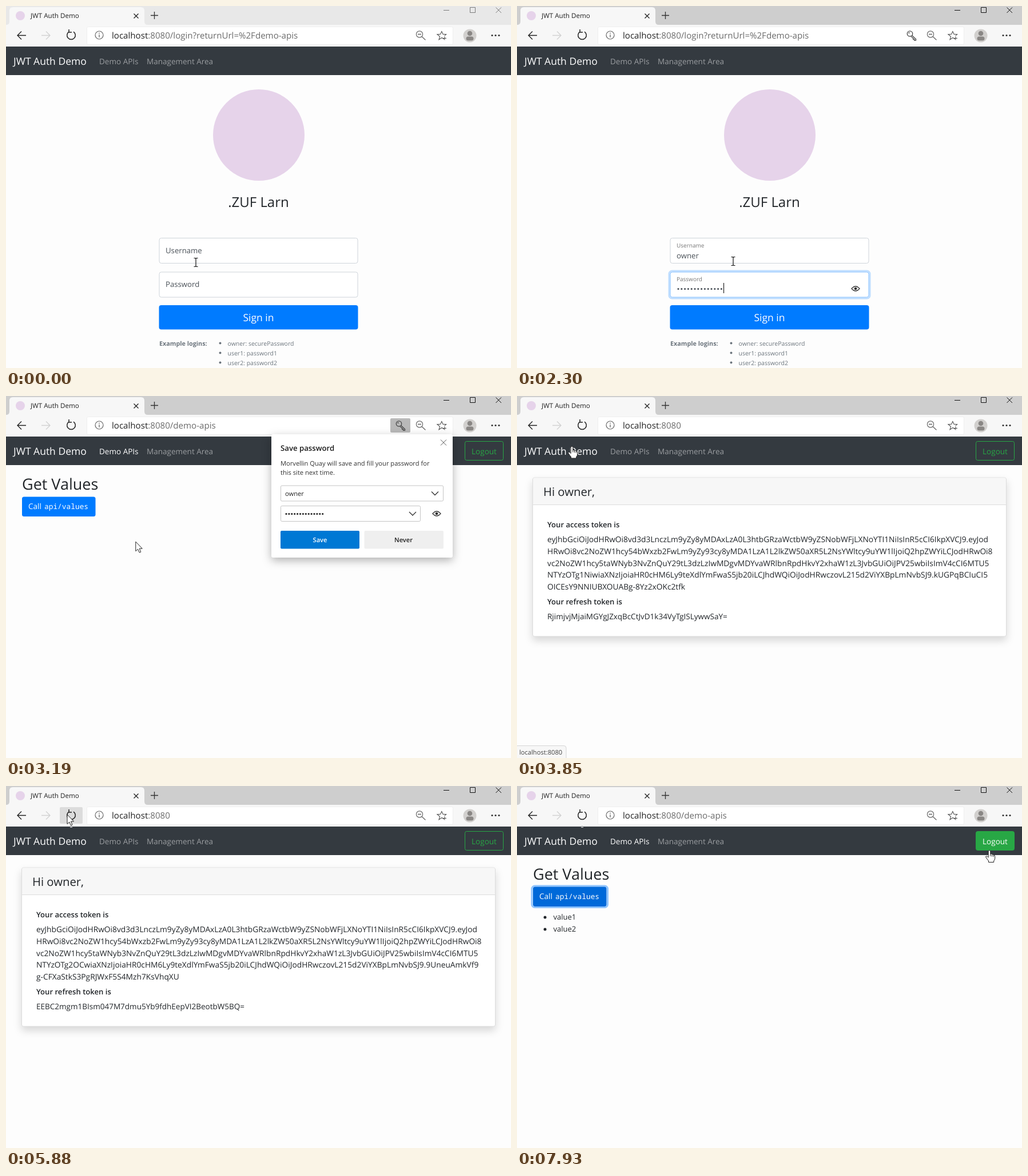
Animation, 883 px wide and 634 px high, one loop 7990 ms. Source, as an HTML page:

```html
<!DOCTYPE html>
<html lang="en">
<head>
<meta charset="utf-8">
<title>JWT Auth Demo</title>
<style>
  html, body { margin: 0; width: 100%; height: 100%; overflow: hidden; background: #fdfdfd; }
  svg { display: block; width: 883px; height: 634px; font-family: "Open Sans", "Noto Sans", sans-serif; text-rendering: geometricPrecision; }
  text { white-space: pre; }
  .mono { font-family: "Noto Sans Mono", "DejaVu Sans Mono", monospace; }
  .card { filter: drop-shadow(0 7px 7px rgba(0, 0, 0, .15)); }
  .popup { filter: drop-shadow(0 5px 8px rgba(0, 0, 0, .3)); }
  .line { fill: none; stroke: #333; stroke-width: 1.3; }
</style>
</head>
<body>
<svg id="stage" viewBox="0 0 883 634"></svg>
<script>
const LOOP = 7990;
const USER = "owner";
const INK = "#212529", BLUE = "#007bff", GREEN = "#28a745";

// Markup helpers
const text = (x, y, size, fill, str, attrs = "") =>
  `<text x="${x}" y="${y}" font-size="${size}" fill="${fill}" ${attrs}>${str}</text>`;
const rect = (x, y, w, h, fill, attrs = "") =>
  `<rect x="${x}" y="${y}" width="${w}" height="${h}" fill="${fill}" ${attrs}/>`;
const dot = (x, y, r, fill, attrs = "") => `<circle cx="${x}" cy="${y}" r="${r}" fill="${fill}" ${attrs}/>`;
const line = (d, attrs = "") => `<path class="line" d="${d}" ${attrs}/>`;
const group = (id, body, attrs = "") => `<g id="${id}" ${attrs}>${body}</g>`;
const MID = 'text-anchor="middle"', SEMI = 'font-weight="600"', MEDIUM = 'font-weight="500"';

const dots = (n, x, y, pitch, fill) =>
  Array.from({ length: n }, (_, i) => dot(x + i * pitch, y, 1.6, fill)).join("");
const eye = (x, y) =>
  line(`M${x - 7} ${y}Q${x} ${y - 8} ${x + 7} ${y}Q${x} ${y + 8} ${x - 7} ${y}Z`) + dot(x, y, 2.3, "#222");
const chevron = (x, y) => line(`M${x - 6} ${y - 3}l6 6l6 -6`);

const browser =
  rect(0, 0, 883, 71, "#cecece", 'id="titlebar"') +
  rect(0, 33, 883, 38, "#f7f7f7") +
  `<path d="M0 33Q6 33 6 27V8Q6 2 12 2H236Q242 2 242 8V27Q242 33 248 33Z" fill="#f7f7f7"/>` +
  dot(25, 17, 8, "#e6d3ea") +
  text(43, 21, 11.6, "#222", "JWT Auth Demo") +
  line("M223.500 13.500l8 8m0 -8l-8 8", 'style="stroke:#222"') +
  line("M253 16.500h13M259.500 10v13") +
  group("windowButtons", line("M765 7.500h10M811.500 2.500h9v9h-9zM856.500 2.500l9.500 9.500m0 -9.500l-9.500 9.500", 'style="stroke:#111;stroke-width:1"')) +
  rect(94, 37, 40, 29, "#dcdcdc", 'id="reloadHover" rx="2"') +
  line("M35 51.500H20m7 -7l-7 7l7 7", 'style="stroke:#222"') +
  line("M62 51.500H77m-7 -7l7 7l-7 7", 'style="stroke:#d2d2d2"') +
  line("M110 45.200A7.300 7.300 0 1 0 118 45.200M110 41v5h5", 'style="stroke:#222;stroke-width:1.5"') +
  rect(141.500, 36.500, 640, 31, "#fff", 'rx="2" stroke="#efefef"') +
  dot(163, 51, 7, "none", 'stroke="#666" stroke-width="1.2"') + line("M163 50v5M163 46.800v1.600", 'style="stroke:#666"') +
  `<text x="185" y="57" font-size="15.1" fill="#222">localhost<tspan fill="#6b6b6b" id="url"></tspan></text>` +
  rect(672, 39, 35, 25, "#b9b9b9", 'id="keyHover" rx="2"') +
  group("key", dot(687, 48.500, 4.700, "none", 'stroke="#444" stroke-width="1.3"') + dot(685.500, 47, 1.1, "#444") +
    line("M690.500 51.500l7 6.500v2h-3v-2h-2v-2l-3.500 -2.500", 'style="stroke:#444"')) +
  dot(723, 49.500, 5.600, "none", 'stroke="#666" stroke-width="1.2"') + line("M720 49.500h6M727 53.500l6.500 6", 'style="stroke:#666"') +
  line("M766 58l-4 -2.500l-5 3.500l1.500 -5.500l-4.500 -4h5.500l2.300 -5l2.300 5h5.500l-3 2.800M764 56.500h6m-3 -3v6", 'style="stroke:#555;stroke-width:1.1"') +
  dot(811, 52, 11.500, "#d2d0ce") + dot(811, 48, 4.300, "#8a8785") + rect(804.500, 53.500, 13, 7, "#8a8785", 'rx="3.500"') +
  dots(3, 850, 51.500, 6, "#333");

const navbar =
  rect(0, 71, 883, 50, "#343a40") +
  text(13, 103, 17.500, "#fff", "JWT Auth Demo") +
  text(163, 102, 13.500, "#9a9da0", "Demo APIs", 'id="navDemo"') +
  text(246, 102, 13.500, "#9a9da0", "Management Area", 'id="navArea"') +
  group("logout", rect(802.500, 79.500, 67, 33, "none", `id="logoutBox" rx="3" stroke="${GREEN}"`) +
    text(836, 102, 13.500, GREEN, "Logout", `id="logoutText" ${MID}`)) +
  rect(112, 70, 4, 3, "#a8abad", 'id="tooltipTail"');

const field = (id, y) =>
  rect(266, y - 2, 351, 48, "none", `id="${id}Ring" rx="5" stroke="#bfdeff" stroke-width="3"`) +
  rect(268, y, 347, 44, "#fff", `id="${id}Box" rx="3.500" stroke="#ced4da"`);

const login =
  dot(442, 226, 80, "#e6d3ea") +
  text(441.500, 352, 24, INK, ".ZUF Larn", `${MID} ${MEDIUM}`) +
  field("user", 406.500) + text(279, 433, 13.200, "#495057", "Username", 'id="userLabel"') +
  text(279, 442, 13.200, "#495057", "", 'id="userText"') +
  field("pass", 466) + text(279, 492, 13.200, "#495057", "Password", 'id="passLabel"') +
  group("passDots", dots(14, 282, 495.500, 5.800, "#495057")) +
  group("passEye", eye(592, 495)) +
  rect(0, 0, 1.200, 18, "#222", 'id="caret"') +
  rect(267.500, 524, 348, 42.500, BLUE, 'rx="4"') + text(441.500, 552, 17.500, "#fff", "Sign in", MID) +
  text(268, 594.500, 10.800, "#6c757d", "Example logins:", 'font-weight="700"') +
  [`${USER}: securePassword`, "user1: password1", "user2: password2"].map((s, i) =>
    dot(374.500, 590.500 + 17 * i, 2, "#6c757d") + text(387.500, 594.500 + 17 * i, 10.500, "#6c757d", s)).join("");

const demo =
  text(28, 164, 27, INK, "Get Values", MEDIUM) +
  rect(26, 175, 132.500, 37.500, "none", 'id="callRing" rx="5" stroke="#8fc4ff" stroke-width="3"') +
  rect(28, 176.500, 128.500, 34.500, BLUE, 'id="callBox" rx="3.500"') +
  text(39, 198, 13.500, "#fff", "Call") + text(67, 198, 12.850, "#fff", "api/values", 'class="mono"') +
  group("values", [1, 2].map(n => dot(49, 209 + 21 * n, 2.500, INK) + text(63.500, 213 + 21 * n, 13, INK, "value" + n)).join(""));

const home =
  `<g class="card">${rect(27.500, 143, 828, 278, "#fff", 'rx="3" stroke="#dcdcdc"')}</g>` +
  rect(28, 143.500, 827, 47, "#f7f7f7", 'rx="3"') + rect(28, 190, 827, 1, "#dcdcdc") +
  text(46, 175, 20.300, INK, `Hi ${USER},`, MEDIUM) +
  text(53, 230, 13.100, INK, "Your access token is", SEMI) +
  [0, 1, 2, 3, 4].map(i => text(53, 256 + 20.800 * i, 13.750, INK, "", `id="token${i}"`)).join("") +
  text(53, 364.500, 13.100, INK, "Your refresh token is", SEMI) +
  text(53, 390.500, 13.500, INK, "", 'id="refreshToken"');

const popup =
  `<g class="popup">${rect(464, 67, 317, 216, "#fff", 'rx="3"')}</g>` +
  line("M760 76.500l10 10m0 -10l-10 10", 'style="stroke:#555;stroke-width:1"') +
  text(480, 96, 13.200, "#1b1b1b", "Save password", SEMI) +
  text(480, 122, 11.150, "#333", "Morvellin Quay will save and fill your password for") +
  text(480, 138, 11.150, "#333", "this site next time.") +
  rect(480.500, 157, 284, 27, "#fff", 'rx="2" stroke="#c4c4c4"') + text(488, 174.500, 11.150, "#222", USER) + chevron(750, 170.500) +
  rect(480.500, 192.500, 244, 27, "#fff", 'rx="2" stroke="#c4c4c4"') + dots(14, 490, 206.500, 4.900, "#222") + chevron(711, 206) +
  eye(753, 206) +
  rect(480, 236, 138, 31.500, "#0078d4", 'rx="2"') + text(549, 255.500, 11.100, "#fff", "Save", `${MID} ${SEMI}`) +
  rect(626.500, 236, 138.500, 31.500, "#efefef", 'rx="2"') + text(695, 255.500, 11.100, "#222", "Never", `${MID} ${SEMI}`);

const status =
  rect(-3, 612.500, 0, 26, "#f7f7f7", 'id="statusBox" rx="4" stroke="#d5d5d5"') +
  text(4, 628, 11.150, "#444", "", 'id="statusText"');

const tooltip = rect(118.500, 66.500, 97, 22, "#fff", 'stroke="#767676"') + text(125, 82, 11.150, "#444", "Refresh (Ctrl+R)");

const cursors =
  group("ibeam", '<path d="M-3.500 -7.500h2.500l1 1l1 -1h2.500M0 -6.500v13M-3.500 7.500h2.500l1 -1l1 1h2.500" fill="none" stroke="#111" stroke-width="1.2"/>') +
  group("arrow", '<path d="M0 0V16.500L3.800 13L6.500 19L9 18L6.500 12H11.500Z" fill="#fff" stroke="#222"/>') +
  group("hand", '<path d="M-1.800 1.500Q0 -1.500 1.800 1.500V7Q3.500 5.500 4.500 7.500Q6.500 6.500 7.200 8.500Q9.500 8 9.700 11V14Q9.500 17 7.700 18.500V21H-1.500V18.500Q-4 16 -6.500 11.500Q-5.500 8.800 -1.800 12.500Z" fill="#fff" stroke="#222"/>' +
    '<path d="M1.800 7v3.500M4.500 8v3M7.200 9v2.500" stroke="#222"/>');

const stage = document.getElementById("stage");
stage.innerHTML = rect(0, 0, 883, 634, "#fdfdfd") + browser + navbar +
  group("login", login) + group("demo", demo) + group("home", home) + group("status", status) +
  group("popup", popup) + group("tooltip", tooltip) +
  dot(0, 0, 12, "#c8c000", 'id="click" opacity=".65"') + group("cursor", cursors);

const el = {};
stage.querySelectorAll("[id]").forEach(node => { el[node.id] = node; });
const show = (id, on) => el[id].setAttribute("display", on ? "inline" : "none");
const set = (id, attrs) => Object.entries(attrs).forEach(([k, v]) => el[id].setAttribute(k, v));
const write = (id, str) => { if (el[id].textContent !== str) el[id].textContent = str; };
const between = (t, a, b) => t >= a && t < b;

// Session tokens: shared head, then the parts that change on each refresh
const TOKEN_HEAD = [
  "eyJhbGciOiJodHRwOi8vd3d3LnczLm9yZy8yMDAxLzA0L3htbGRzaWctbW9yZSNobWFjLXNoYTI1NiIsInR5cCI6IkpXVCJ9.eyJod",
  "HRwOi8vc2NoZW1hcy54bWxzb2FwLm9yZy93cy8yMDA1LzA1L2lkZW50aXR5L2NsYWltcy9uYW1lIjoiQ2hpZWYiLCJodHRwOi8",
  "vc2NoZW1hcy5taWNyb3NvZnQuY29tL3dzLzIwMDgvMDYvaWRlbnRpdHkvY2xhaW1zL3JvbGUiOiJPV25wbiIsImV4cCI6MTU5"
];
const TOKEN_BODY = "wiaXNzIjoiaHR0cHM6Ly9teXdlYmFwaS5jb20iLCJhdWQiOiJodHRwczovL215d2ViYXBpLmNvbSJ9.";
const SESSIONS = [
  { stamp: "g1Ni", sign: ["kUGPqBCIuCI5", "OICEsY9NNIUBXOUABg-8Yz2xOKc2tfk"], refresh: "RjimjvjMjaiMGYgJZxqBcCtJvD1k34VyTgISLywwSaY=" },
  { stamp: "g2Ny", sign: ["6c6Z4r9S_dBaH", "41ZjZTKEBFj6LfNY4NRQBVifjMb7ko"], refresh: "TU74M4T+WkcnVObb9Th0ojexq/6L6jQhzyAG/AFv71A=" },
  { stamp: "g2OC", sign: ["9UneuAmkVf9", "g-CFXaStkS3PgRJWxF5S4Mzh7KsVhqXU"], refresh: "EEBC2mgm1BIsm047M7dmu5Yb9fdhEepVI2BeotbW5BQ=" }
];

// Timeline: pointer stops are [ms, x, y]
const POINTER = [
  [0, 332, 449], [70, 332, 449], [160, 366, 441], [310, 366, 441], [480, 378, 447], [2390, 378, 447], [2470, 376, 446],
  [2930, 376, 446], [3430, 96, 88], [4390, 96, 88], [4560, 107, 50], [6670, 107, 50], [6930, 195, 92],
  [7210, 195, 92], [7430, 104, 196], [7580, 104, 196], [7930, 826, 112.500]
];
const CLICKS = [[160, 310], [3510, 3650], [4640, 4800], [5650, 5800], [6930, 7130], [7430, 7560]];
const USER_KEYS = [310, 400, 500, 600, 700];
const PASS_KEYS = [1100, 1180, 1260, 1350, 1450, 1540, 1640, 1720, 1900, 1960, 2120, 2180, 2240, 2290];
const typed = (keys, t) => keys.filter(k => k <= t).length;

function pointerAt(t) {
  const i = POINTER.findIndex(p => p[0] > t);
  if (i < 0) return POINTER[POINTER.length - 1].slice(1);
  const [t0, x0, y0] = POINTER[i - 1], [t1, x1, y1] = POINTER[i];
  const k = (t - t0) / (t1 - t0), e = k * k * (3 - 2 * k);
  return [x0 + (x1 - x0) * e, y0 + (y1 - y0) * e];
}

function drawLogin(t) {
  const letters = typed(USER_KEYS, t), secrets = typed(PASS_KEYS, t);
  const focus = t < 230 ? "" : t < 940 ? "user" : "pass";
  for (const [id, count, big, small] of [["user", letters, 433, 423], ["pass", secrets, 492, 481.500]]) {
    show(id + "Ring", focus === id);
    set(id + "Box", { stroke: focus === id ? "#80bdff" : "#ced4da" });
    set(id + "Label", { y: count ? small : big, "font-size": count ? 10 : 13.200, fill: count ? "#777" : "#495057" });
  }
  write("userText", USER.slice(0, letters));
  [...el.passDots.children].forEach((node, i) => node.setAttribute("display", i < secrets ? "inline" : "none"));
  show("passEye", secrets > 0);
  show("key", secrets > 0);
  show("caret", focus);
  const userEnd = letters ? 279.500 + el.userText.getComputedTextLength() : 279;
  set("caret", focus === "user"
    ? { x: userEnd, y: letters ? 428 : 419 }
    : { x: 279 + secrets * 5.850, y: secrets ? 485 : 478 });
}

function drawHome(t) {
  const { stamp, sign, refresh } = SESSIONS[t < 4800 ? 0 : t < 5800 ? 1 : 2];
  const lines = [...TOKEN_HEAD, "NTYzOT" + stamp + TOKEN_BODY + sign[0], sign[1]];
  lines.forEach((s, i) => write("token" + i, s));
  write("refreshToken", refresh);
}

function draw(t) {
  const page = t < 2430 ? "login" : t < 3750 || t >= 7050 ? "demo" : "home";
  const [x, y] = pointerAt(t);
  const over = (x0, y0, x1, y1) => x >= x0 && x <= x1 && y >= y0 && y <= y1;
  const onBrand = over(13, 80, 141, 114), onDemo = over(163, 80, 232, 114), onArea = over(246, 80, 363, 114);
  const onCall = page === "demo" && over(28, 176, 157, 211);
  const onLogout = page !== "login" && over(802, 79, 870, 114);
  const popupOpen = between(t, 2500, 3570);

  ["login", "demo", "home"].forEach(id => show(id, id === page));
  set("titlebar", { fill: t < 70 ? "#e8e8e8" : "#cecece" });
  set("windowButtons", { opacity: t < 70 ? 0.5 : 1 });
  write("url", { login: ":8080/login?returnUrl=%2Fdemo-apis", demo: ":8080/demo-apis", home: ":8080" }[page]);

  if (page === "login") drawLogin(t);
  else show("key", popupOpen);
  if (page === "home") drawHome(t);
  show("keyHover", popupOpen);
  show("popup", popupOpen);

  set("navDemo", { fill: page === "demo" || onDemo ? "#fff" : "#9a9da0" });
  set("navArea", { fill: onArea ? "#c9cbcd" : "#9a9da0" });
  show("logout", page !== "login");
  set("logoutBox", { fill: onLogout ? GREEN : "none" });
  set("logoutText", { fill: onLogout ? "#fff" : GREEN });

  const called = between(t, 7430, LOOP);
  show("callRing", called);
  set("callBox", { fill: called || onCall ? "#0069d9" : BLUE });
  show("values", t >= 7560);

  show("reloadHover", over(94, 37, 134, 66));
  show("tooltip", between(t, 5060, 5650));
  show("tooltipTail", t >= 5650);

  const [label, width] = between(t, 2470, 2930) ? ["Waiting for cache...", 292]
    : onBrand ? ["localhost:8080", 86]
    : onDemo ? ["localhost:8080/demo-apis", 147] : ["", 0];
  show("status", label);
  write("statusText", label);
  set("statusBox", { width: width + 3 });

  show("click", CLICKS.some(([a, b]) => between(t, a, b)));
  set("click", { cx: x, cy: y });
  const kind = page === "login" ? "ibeam" : onBrand || onDemo || onArea || onCall || onLogout ? "hand" : "arrow";
  ["ibeam", "arrow", "hand"].forEach(id => show(id, id === kind));
  set("cursor", { transform: `translate(${x} ${y})` });
}

const start = performance.now();
function tick() {
  draw((performance.now() - start) % LOOP);
  requestAnimationFrame(tick);
}
tick();
</script>
</body>
</html>
```
